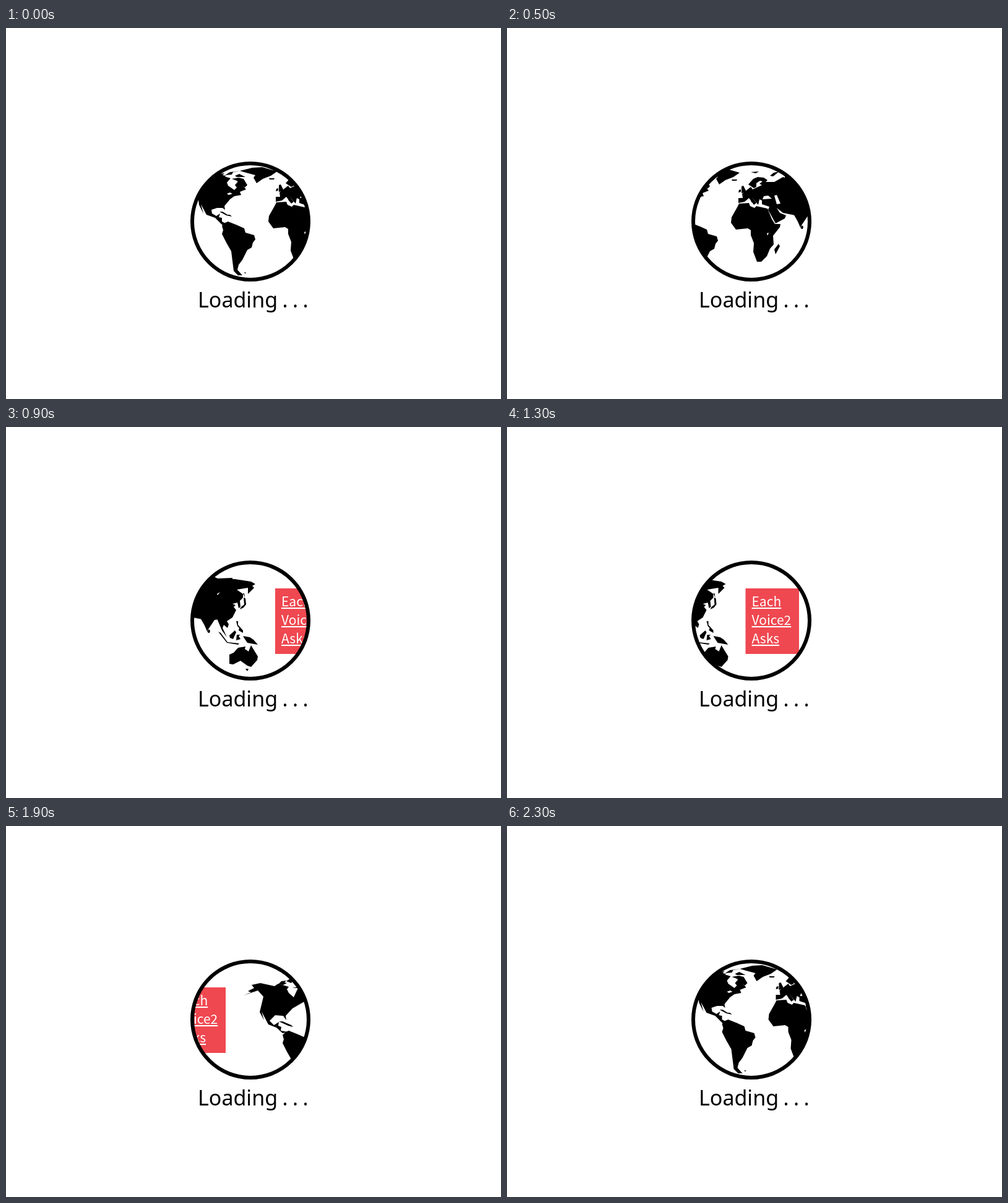
An HTML page for the animation above (2.4 s loop, 800 by 600 pixels).

```html
<!DOCTYPE html>
<html lang="en">
<head>
<meta charset="utf-8">
<title>Loading</title>
<style>
  html, body { margin: 0; width: 100%; height: 100%; overflow: hidden; background: #fff; }
  svg { display: block; width: 800px; height: 600px; }
  .sea { fill: #fff; }
  .label { font: 34px "Noto Sans", "Open Sans", sans-serif; word-spacing: -1.4px; }
  .card text {
    font: 21px "Noto Sans CJK SC", "Noto Sans CJK JP", "Noto Sans", sans-serif; fill: #fff;
    text-decoration: underline; text-decoration-thickness: 1px; text-underline-offset: 3px;
  }
</style>
</head>
<body>
<svg viewBox="0 0 800 600">
  <defs>
    <clipPath id="disc"><circle cx="395" cy="313" r="92"/></clipPath>

    <g id="atlantic">
      <!-- North America -->
      <path d="M285 253L306 240 343 237 363 243 357 250 359 255 369 262 373 258 370 254 376 247 388 261 378 265 380 270 369 272 362 277 353 288 354 294 350 291 341 291 332 294 333 300 340 304 346 300 344 306 349 307 349 313 357 317 350 319 338 307 324 302 315 285 319 300 312 286 310 270 302 253Z"/>
      <path class="sea" d="M357 268L362 266 366 268 360 270Z"/>
      <!-- Arctic islands, Caribbean -->
      <path d="M337 240L344 236 353 235 350 238 356 239 349 242Z"/>
      <path d="M354 238L362 233 382 231 367 233 365 237Z"/>
      <path d="M365 244L376 242 384 244 390 254 386 258 373 247Z"/>
      <path d="M370 239L377 236 387 241 373 241Z"/>
      <path d="M345 297L350 297 358 302 362 302 365 305 356 303Z"/>
      <!-- Greenland, Iceland -->
      <path d="M378 231L398 226 414 225 438 232 428 239 415 244 405 251 400 242 403 238 388 234Z"/>
      <path d="M425 243L434 243 433 245 426 245Z"/>
      <path id="south" d="M349 320L354 315 359 313 374 319 385 324 387 331 401 335 403 342 399 347 397 355 390 359 382 375 376 383 374 391 382 400 375 400 368 393 364 361 356 347 349 333 351 327Z"/>
      <path d="M384 396L387 395 388 397Z"/>

      <g transform="translate(62 -2)">
        <!-- Africa -->
        <path d="M375 284L391 283 393 288 400 291 403 288 421 292 428 309 433 317 442 317 441 322 430 336 431 350 425 357 420 369 411 378 404 378 398 362 399 348 394 335 394 327 389 324 370 326 362 315 363 306 372 290Z"/>
        <path d="M439 349L441 353 434 366 432 358Z"/>
        <path class="sea" d="M420 332L423 331 421 336Z"/>
        <!-- Europe and western Asia -->
        <path d="M374 283L374 275 381 275 380 268 394 257 397 261 412 254 408 252 413 248 409 247 403 251 403 257 399 259 390 253 398 244 405 241 415 242 421 246 418 249 432 249 446 241 454 244 468 238 515 236 515 300 486 304 474 322 466 303 446 299 436 291 441 299 451 303 449 308 434 316 422 294 424 289 412 285 412 279 408 277 406 286 395 273 403 283 399 286 391 275 384 281Z"/>
        <path class="sea" d="M413 277L415 272 422 271 428 276Z"/>
        <path class="sea" d="M432 271L436 270 442 284 436 285Z"/>
        <!-- Islands -->
        <path d="M379 256L382 255 386 263 385 266 379 267Z"/>
        <path d="M375 262L378 261 378 265 374 266Z"/>
        <path d="M394 233L407 232 402 235Z"/>
        <path d="M425 239L431 234 440 232 430 240Z"/>
        <path d="M394 279L396 279 396 283Z"/>
        <path d="M474 320L477 322 475 325Z"/>
      </g>
    </g>

    <!-- Eastern Asia and Oceania -->
    <g id="orient" transform="translate(211 -10)">
      <path d="M300 246L336 242 344 246 370 246 396 250 403 254 398 257 401 260 391 270 391 260 373 263 383 270 383 276 378 281 379 291 376 293 374 284 366 286 371 288 368 291 372 296 366 308 357 314 360 319 358 325 352 320 350 325 357 340 349 329 341 310 337 309 328 319 325 330 321 321 313 307 300 304Z"/>
      <path class="sea" d="M341 270L346 267 342 272Z"/>
      <path d="M384 276L387 277 388 287 384 292 378 295 380 291 385 287Z"/>
      <path d="M383 269L385 269 386 276Z"/>
      <path d="M327 327L330 329 329 333 327 333Z"/>
      <path d="M343 331L347 333 358 348 377 350 375 352 357 349Z"/>
      <path d="M361 337L370 329 372 332 367 343 362 341Z"/>
      <path d="M373 336L379 336 376 338 379 343 372 345Z"/>
      <path d="M372 314L375 314 375 320 383 329 383 333 376 329 377 325 374 322Z"/>
      <path d="M383 338L394 340 400 344 407 352 401 351 390 349 386 343Z"/>
      <path d="M361 368L368 365 375 357 387 355 386 359 392 363 396 353 407 371 406 377 396 388 390 386 379 378 367 384 361 383Z"/>
      <path d="M387 391L392 391 390 395Z"/>
    </g>

    <!-- The Americas seen from the Pacific -->
    <g id="pacific" transform="translate(377.5 -10)">
      <path d="M384 274L396 269 391 267 401 262 397 257 411 254 434 259 440 255 457 260 454 264 457 270 465 277 471 264 476 266 484 278 482 284 463 295 452 307 453 314 448 307 435 306 426 315 433 322 441 317 440 323 445 325 444 331 455 333 447 335 437 326 424 321 413 300 417 314 410 301 416 276 407 266Z"/>
      <path d="M440 256L445 251 453 250 450 253 454 254 448 257Z"/>
      <path d="M453 251L459 247 465 248 461 254Z"/>
      <path d="M462 262L473 260 476 255 485 261 481 268 472 262Z"/>
      <path d="M441 316L447 316 461 322 464 325 456 323Z"/>
      <use href="#south" x="98" y="18"/>
    </g>
  </defs>

  <g clip-path="url(#disc)">
    <g id="strip">
      <use href="#atlantic"/><use href="#orient"/><use href="#pacific"/>
    </g>
    <use id="nextTurn" href="#atlantic"/>
    <g id="card" class="card">
      <rect x="646" y="261" width="86.5" height="106" fill="#ef4850"/>
      <text x="656" y="290">Each</text>
      <text x="656" y="320">Voice2</text>
      <text x="656" y="350">Asks</text>
    </g>
  </g>
  <circle cx="395" cy="313" r="94" fill="none" stroke="#000" stroke-width="6"/>
  <text class="label" x="310" y="452">Loading . . .</text>
</svg>
<script>
const STEP = 100, STEPS = 24, TURN = 476;
const stops = [[0, 0], [5, -62], [9, -211], [13, -260.5], [17, -313.5], [19, -377.5], [23, -477.5]];
const [strip, nextTurn, card] = ["strip", "nextTurn", "card"].map(id => document.getElementById(id));

const rate = i => (stops[i + 1][1] - stops[i][1]) / (stops[i + 1][0] - stops[i][0]);

// Harmonic mean of neighbouring rates keeps the slide monotone.
function slope(i) {
  if (i === 0 || i === stops.length - 1) return 0;
  const a = rate(i - 1), b = rate(i);
  return 2 * a * b / (a + b);
}

function slide(step) {
  let i = 0;
  while (i < stops.length - 2 && step > stops[i + 1][0]) i++;
  const [t0, x0] = stops[i], [t1, x1] = stops[i + 1];
  const span = t1 - t0, s = (step - t0) / span, r = 1 - s;
  return x0 * r * r * (1 + 2 * s) + x1 * s * s * (3 - 2 * s)
    + span * s * r * (slope(i) * r - slope(i + 1) * s);
}

const move = (node, x, y) => node.setAttribute("transform", `translate(${x} ${y})`);
const show = (node, on) => node.setAttribute("visibility", on ? "visible" : "hidden");

function draw(time) {
  const step = Math.floor(time / STEP) % STEPS;
  const x = slide(step);
  const drop = x > -62 ? -x / 31 : Math.min(10, 2 + (-x - 62) * 8 / 149);
  move(strip, x, drop);
  move(nextTurn, x + TURN, (x + 477.5) / 5);
  move(card, x, 0);
  show(strip, step < 20);
  show(nextTurn, step >= 20);
}

const start = performance.now();
function tick() {
  draw(performance.now() - start);
  requestAnimationFrame(tick);
}
draw(0);
requestAnimationFrame(tick);
</script>
</body>
</html>
```
